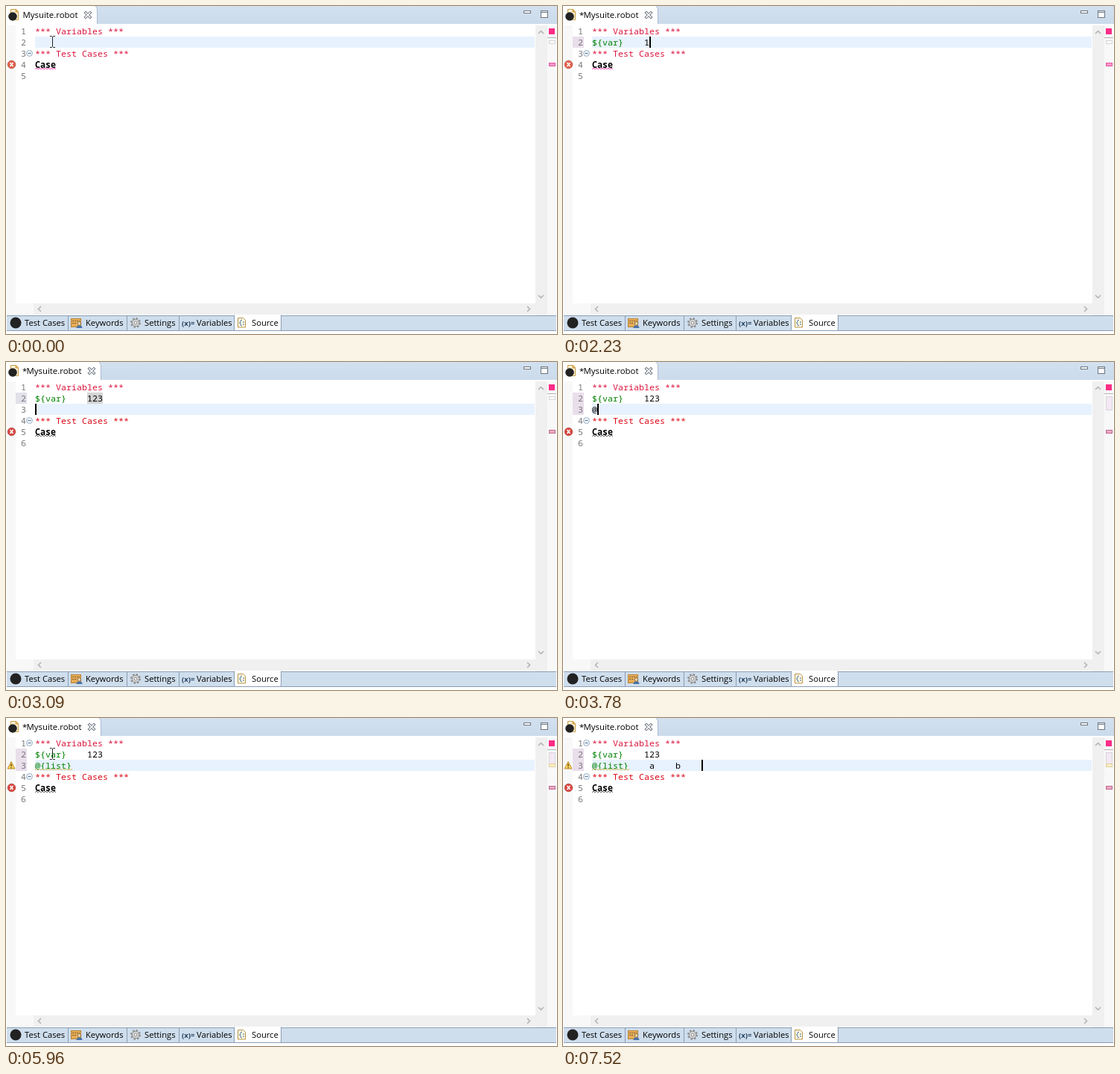
Recreate the animation shown at these times as an HTML page. Size 740 by 440 pixels, loop 8 s.

```html
<!DOCTYPE html>
<html lang="en">
<head>
<meta charset="utf-8">
<title>Robot suite editor</title>
<style>
html, body { margin: 0; width: 100%; height: 100%; overflow: hidden; background: #fff; }
svg { display: block; width: 740px; height: 440px; }
text { white-space: pre; }
.ui { font: 11.2px "Open Sans", "Noto Sans", sans-serif; fill: #000; }
.code { font: 11.667px "Noto Sans Mono", "DejaVu Sans Mono", monospace; }
.bold { font-weight: 700; }
.crisp { shape-rendering: crispEdges; }
</style>
</head>
<body>
<svg id="stage" viewBox="0 0 740 440" xmlns="http://www.w3.org/2000/svg">
  <defs>
    <linearGradient id="bar" x2="0" y2="1">
      <stop stop-color="#d2e0ef"/><stop offset="1" stop-color="#cbdbeb"/>
    </linearGradient>
  </defs>
  <rect width="740" height="440" fill="#fff"/>

  <!-- title bar -->
  <rect width="740" height="24" fill="url(#bar)"/>
  <path id="tab" fill="#fff" stroke="#a9bacd"/>
  <path d="M6.500 4.500h7l3 3v11h-10z" fill="#fff3d6" stroke="#c79a45"/>
  <path d="M13 4.500v3.500h3.500" fill="#e9b65c" stroke="#c79a45"/>
  <circle cx="9" cy="14" r="5.800" fill="#222"/>
  <text id="star" class="ui" x="22" y="16">*</text>
  <text id="name" class="ui" y="16" style="font-size:11.4px">Mysuite.robot</text>
  <g id="close" fill="none" stroke-linecap="square">
    <path d="M-3 -3L3 3M3 -3L-3 3" stroke="#707782" stroke-width="3.600"/>
    <path d="M-3 -3L3 3M3 -3L-3 3" stroke="#fff" stroke-width="1.600"/>
  </g>
  <g class="crisp" fill="#fff" stroke="#6d7580">
    <rect x="695.500" y="6.500" width="9" height="3"/>
    <rect x="718.500" y="6.500" width="9" height="9"/>
    <path d="M718 8.500h10"/>
  </g>

  <!-- editor frame -->
  <g class="crisp">
    <rect x="1" y="26" width="12" height="389" fill="#f8f8f8"/>
    <rect x="13" y="399" width="24" height="15" fill="#f8f8f8"/>
    <rect x="727" y="26" width="12" height="389" fill="#f8f8f8"/>
    <rect x="711" y="26" width="16" height="389" fill="#f0f0f0"/>
    <rect x="37" y="399" width="690" height="15" fill="#f0f0f0"/>
    <rect x="729" y="30" width="8" height="8" fill="#ff2d86"/>
    <rect x="727" y="42" width="12" height="1" fill="#b4b4b4"/>
  </g>
  <g fill="none" stroke="#b2b2b2" stroke-width="1.500">
    <path d="M715 37l3.500 -3.500l3.500 3.500M715 388l3.500 3.500l3.500 -3.500M47 403l-3.500 3.500l3.500 3.500M700 403l3.500 3.500l-3.500 3.500"/>
  </g>

  <!-- page tabs -->
  <rect x="1" y="415" width="738" height="21" fill="#cfdeed"/>
  <path class="crisp" d="M1 415.500H307M370 415.500H739M1 435.500H739M83.500 416v20M162.500 416v20M232.500 416v20" stroke="#8c9db2"/>
  <path d="M306.500 414.500V435.500H367.500Q369.500 435.500 369.500 433V414.500" fill="#fff" stroke="#8c9db2"/>
  <circle cx="13" cy="425" r="7.500" fill="#222"/>
  <g>
    <rect x="87.500" y="419.500" width="13" height="11" fill="#e5ac58" stroke="#b98434"/>
    <path d="M89 422.500h10M89 425.500h5" stroke="#7c5a2a" stroke-dasharray="2 1"/>
    <circle cx="98.500" cy="426" r="2.300" fill="#f4d7a8" stroke="#68513a" stroke-width=".7"/>
    <path d="M94.500 432q0 -3.500 4 -3.500t4 3.500z" fill="#4771a8"/>
  </g>
  <g transform="translate(174 425)" fill="none" stroke="#8d8d8d">
    <circle r="5.800" stroke-width="2.400" stroke-dasharray="2.300 2.250"/>
    <circle r="4.700" fill="#d9d9d9"/>
    <circle r="2" fill="#f5f5f5"/>
  </g>
  <text class="ui" x="236" y="429" style="font-size:9.5px;font-weight:700;fill:#24415f">(x)=</text>
  <path d="M311.500 418.500h7l3 3v9.500h-10z" fill="#fff8e0" stroke="#b8944a"/>
  <path d="M317 421q-2 0 -2 2t-1.500 2q1.500 0 1.500 2t2 2M318 424h2M318 427h2" fill="none" stroke="#3d6ea5"/>
  <g class="ui">
    <text x="25" y="429">Test Cases</text>
    <text x="107" y="429">Keywords</text>
    <text x="186" y="429">Settings</text>
    <text x="256" y="429">Variables</text>
    <text x="330" y="429">Source</text>
  </g>

  <g id="doc"></g>
</svg>
<script>
const $ = id => document.getElementById(id);
const LOOP = 8000, LEFT = 39, CH = 7, ROW = 15;
const rowTop = n => 26 + (n - 1) * ROW;
const col = c => LEFT + c * CH;

// each step changes part of the editor state
const steps = [
  [0, { mouse: 1, dirty: 0, l2: '', l3: null, row: 2, caret: -1, hl: null, q2: '', q3: '', box: 5, fold: 0, warn: 0 }],
  [500, { mouse: 0, l2: '$', caret: 1, q2: '#e9deec' }],
  [530, { dirty: 1 }],
  [760, { l2: '${}', caret: 2 }],
  [840, { l2: '${va}', caret: 4, hl: [0, 5] }],
  [1070, { l2: '${var}', caret: 5, hl: [0, 6] }],
  [1220, { caret: 6 }],
  [1700, { caret: 10 }],
  [1770, { hl: null }],
  [2230, { l2: '${var}    1', caret: 11 }],
  [2300, { hl: [10, 11] }],
  [2380, { l2: '${var}    12', caret: 12 }],
  [2460, { hl: [10, 12] }],
  [2630, { l2: '${var}    123', caret: 13 }],
  [2710, { hl: [10, 13] }],
  [3090, { l3: '', row: 3, caret: 0, q2: '#e2e0ea' }],
  [3170, { hl: null, q2: '#e9deec' }],
  [3700, { l3: '@', caret: 1, q3: '#e9deec' }],
  [3780, { box: 19 }],
  [4180, { l3: '@{}', caret: 2 }],
  [4250, { l3: '@{li}', caret: 4, hl: [0, 5] }],
  [4330, { l3: '@{lis}', caret: 5, hl: [0, 6] }],
  [4480, { l3: '@{list}', caret: 6, hl: [0, 7] }],
  [4960, { caret: 7 }],
  [5260, { caret: 11 }],
  [5340, { hl: null }],
  [5890, { mouse: 1, caret: -1 }],
  [5960, { fold: 1, warn: 1 }],
  [6670, { l3: '@{list}    a', mouse: 0, caret: 12 }],
  [6740, { hl: [11, 12] }],
  [6970, { caret: 16, hl: null }],
  [7050, { mouse: 1 }],
  [7280, { l3: '@{list}    a    b', mouse: 0, caret: 17, hl: [16, 17] }],
  [7520, { caret: 21, hl: null }]
];

const rect = (x, y, w, h, fill, more = '') =>
  `<rect class="crisp" x="${x}" y="${y}" width="${w}" height="${h}" fill="${fill}" ${more}/>`;
const text = (x, n, s, fill, style = '') =>
  `<text class="code ${style}" x="${x}" y="${rowTop(n) + 12}" fill="${fill}">${s}</text>`;

function wave(n, cols, color) {
  let d = `M${LEFT} ${rowTop(n) + 14}`;
  for (let i = 0; i < cols * CH / 2; i++) d += i % 2 ? 'l2 2' : 'l2 -2';
  return `<path d="${d}" fill="none" stroke="${color}"/>`;
}

const foldMark = n => {
  const y = rowTop(n) + 7.5;
  return `<circle cx="31.5" cy="${y}" r="4" fill="#eef4fa" stroke="#9bb0c7"/>
    <path d="M29.500 ${y}h4" stroke="#56718e"/>`;
};

const errorMark = (n, color) =>
  `<g transform="translate(7.5 ${rowTop(n) + 7.5})"><circle r="5.3" fill="${color}" stroke="#b4493f" stroke-width=".8"/>
   <path d="M-2 -2.500L2 2.500M2 -2.500L-2 2.500" stroke="#fff" stroke-width="1.600"/></g>`;

const warnMark = n =>
  `<g transform="translate(7 ${rowTop(n) + 7.5})"><path d="M0 -5L5 4.500H-5Z" fill="#fbd75e" stroke="#bd8a2c" stroke-linejoin="round"/>
   <path d="M0 -2V1.500M0 2.500V3.700" stroke="#4c3510" stroke-width="1.300"/></g>`;

const pointer = `<path d="M59 40.500h2.500l1 1l1 -1h2.500M62.500 41v13M59 55.500h2.500l1 -1l1 1h2.500" fill="none" stroke="#222"/>`;

// variable name in green, its values in black
function varLine(n, s) {
  const end = s.indexOf('}') + 1;
  return text(LEFT, n, s.slice(0, end), '#008000') + text(col(end), n, s.slice(end), '#000');
}

function draw(s) {
  const grown = s.l3 !== null;
  const head = grown ? 4 : 3, last = head + 2, bad = head + 1;
  const shift = s.dirty ? 5 : 0, edge = 122.5 + shift;
  $('tab').setAttribute('d', `M-1 25V-1H${edge - 6}Q${edge} -1 ${edge} 6V25`);
  $('star').setAttribute('visibility', s.dirty ? 'visible' : 'hidden');
  $('name').setAttribute('x', 22.5 + shift);
  $('close').setAttribute('transform', `translate(${110 + shift} 12)`);

  let out = rect(0, 24, 740, 2, '#fff') + rect(LEFT, rowTop(s.row), 671, ROW, '#e7f2fe');
  if (s.q2) out += rect(13, rowTop(2), 15, ROW, s.q2);
  if (s.q3) out += rect(13, rowTop(3), 15, ROW, s.q3);
  if (s.hl) {
    const n = s.hl[0] === 10 ? 2 : s.row;
    out += rect(col(s.hl[0]), rowTop(n), (s.hl[1] - s.hl[0]) * CH, ROW, '#d4d4d4');
  }
  for (let n = 1; n <= last; n++) out += text(20, n, n, '#787878');
  out += text(LEFT, 1, '*** Variables ***', '#dc143c');
  out += text(LEFT, head, '*** Test Cases ***', grown ? '#dc0816' : '#dc143c');
  out += varLine(2, s.l2);
  if (grown) out += varLine(3, s.l3);
  out += wave(bad, 4, grown ? '#666' : '#f050b4');
  out += text(LEFT, bad, 'Case', '#000', 'bold');
  out += foldMark(head) + errorMark(bad, grown ? '#d9453f' : '#e4614b');
  if (s.fold) out += foldMark(1);
  if (s.warn) out += warnMark(3) + wave(3, 7, '#c9bd62');

  // overview ruler
  out += rect(729.5, 46.5, 8, s.box - 1, s.box > 5 ? '#f3e8f4' : '#fafafa', 'stroke="#d8d4da"');
  if (s.warn) out += rect(729.5, 61.5, 8, 4, '#fbeec4', 'stroke="#e0cf9c"');
  out += rect(729.5, rowTop(bad) + 5.5, 8, 4, grown ? '#f3a9c8' : '#ff96cb', `stroke="${grown ? '#b9698b' : '#e0589b'}"`);

  if (s.caret >= 0) out += rect(col(s.caret), rowTop(s.row), 2, ROW, '#000');
  if (s.mouse) out += pointer;
  $('doc').innerHTML = out;
}

let shown = -1;
function frame(now) {
  const t = now % LOOP;
  const count = steps.filter(([at]) => at <= t).length;
  if (count !== shown) {
    shown = count;
    draw(Object.assign({}, ...steps.slice(0, count).map(([, change]) => change)));
  }
  requestAnimationFrame(frame);
}
frame(0);
</script>
</body>
</html>
```
